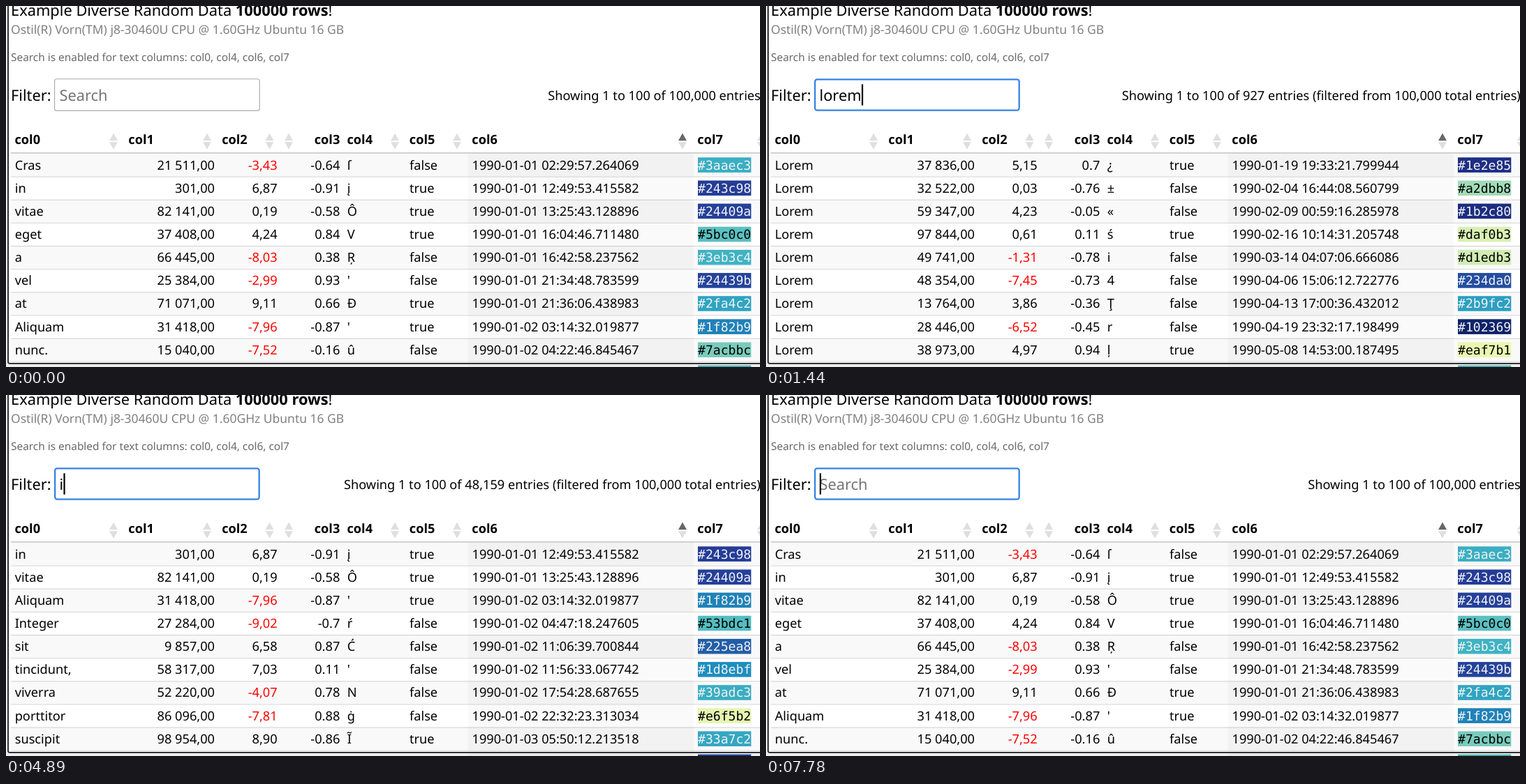
Write an HTML page that moves like this. It is 1080 px wide and 518 px high and loops after 8000 ms.

```html
<!DOCTYPE html>
<html lang="en">
<head>
<meta charset="utf-8">
<title>Filterable table</title>
<style>
html, body { margin: 0; width: 100%; height: 100%; overflow: hidden; background: #fff; }
svg { display: block; width: 1080px; height: 518px; }
text { font: 18.2px "Noto Sans", sans-serif; text-rendering: geometricPrecision; white-space: pre; }
.bold { font-weight: 700; }
.big { font-size: 21.84px; }
.cpu { font-size: 17.47px; fill: #808080; }
.note { font-size: 15.4px; fill: #696969; }
.mono { font-family: "DejaVu Sans Mono", monospace; font-size: 18.1px; }
.end { text-anchor: end; }
</style>
</head>
<body>
<svg id="stage" viewBox="0 0 1080 518"></svg>
<script>
const LOOP = 8000;
const ROW = 33.15, TOP = 211.4, BASE = 234.5, INPUT_X = 76.5;

// word | col1 | col2 | col3 | col4 | col5 | col6 | col7
const rows = `
Cras|21 511|-3,43|-0.64|ſ|false|1990-01-01 02:29:57.264069|#3aaec3
in|301|6,87|-0.91|į|true|1990-01-01 12:49:53.415582|#243c98
vitae|82 141|0,19|-0.58|Ô|true|1990-01-01 13:25:43.128896|#24409a
eget|37 408|4,24|0.84|V|true|1990-01-01 16:04:46.711480|#5bc0c0
a|66 445|-8,03|0.38|Ŗ|false|1990-01-01 16:42:58.237562|#3eb3c4
vel|25 384|-2,99|0.93|'|false|1990-01-01 21:34:48.783599|#24439b
at|71 071|9,11|0.66|Đ|true|1990-01-01 21:36:06.438983|#2fa4c2
Aliquam|31 418|-7,96|-0.87|'|true|1990-01-02 03:14:32.019877|#1f82b9
nunc.|15 040|-7,52|-0.16|û|false|1990-01-02 04:22:46.845467|#7acbbc
Integer|27 284|-9,02|-0.7|ŕ|false|1990-01-02 04:47:18.247605|#53bdc1
sit|9 857|6,58|0.87|Ć|false|1990-01-02 11:06:39.700844|#225ea8
tincidunt,|58 317|7,03|0.11|'|false|1990-01-02 11:56:33.067742|#1d8ebf
viverra|52 220|-4,07|0.78|N|false|1990-01-02 17:54:28.687655|#39adc3
porttitor|86 096|-7,81|0.88|ġ|false|1990-01-02 22:32:23.313034|#e6f5b2
suscipit|98 954|8,90|-0.86|Ĩ|true|1990-01-03 05:50:12.213518|#33a7c2
nisi|44 172|2,36|0.41|e|true|1990-01-03 07:18:52.603417|#24429b
Pellentesque|55 619|1,39|-0.74|5|false|1990-01-03 10:04:42.493177|#2fa4c2
scelerisque.|50 761|-1,27|-0.69|ä|false|1990-01-04 00:29:27.700191|#a5dcb7
vel|82 469|-6,49|-0.29|G|false|1990-01-04 01:33:48.600672|#192b7c
elit.|45 004|-2,77|0.55|Z|false|1990-01-04 10:54:12.828424|#12256d
vulputate|58 736|-8,16|0.33|?|false|1990-01-04 17:06:02.604855|#2166ac
felis|52 217|1,11|-0.05|g|false|1990-01-04 19:08:26.722471|#2094c0
Duis|84 558|-5,31|0.92|L|true|1990-01-05 08:48:05.244305|#2075b3
dolor|63 280|3,74|-0.22|w|false|1990-01-05 13:27:40.518236|#2a9fc1
lobortis|17 935|-4,60|0.49|ñ|true|1990-01-09 06:12:31.470982|#24409a
adipiscing|72 648|5,08|0.37|K|false|1990-01-11 15:40:09.336174|#a2dbb8
ipsum|80 138|6,72|0.2|Y|false|1990-01-16 21:44:39.953010|#f7fcc7
Lorem|37 836|5,15|0.7|¿|true|1990-01-19 19:33:21.799944|#1e2e85
lobortis|90 417|0,82|-0.61|7|false|1990-01-22 10:05:57.204613|#53bdc1
suscipit|33 706|-2,45|-0.18|é|true|1990-01-24 08:31:14.690257|#1f82b9
dolor|48 092|-6,17|0.14|B|true|1990-01-27 18:50:26.843095|#e6f5b2
ipsum|60 143|-6,29|0.15|ë|false|1990-01-28 01:44:21.412639|#f6fbc5
adipiscing|26 851|7,93|-0.55|q|true|1990-02-03 12:16:48.127340|#225ea8
Lorem|32 522|0,03|-0.76|±|false|1990-02-04 16:44:08.560799|#a2dbb8
lobortis|75 364|-1,98|0.8|Ä|false|1990-02-06 03:22:10.958471|#39adc3
Lorem|59 347|4,23|-0.05|«|false|1990-02-09 00:59:16.285978|#1b2c80
dolor|11 623|9,26|-0.43|d|false|1990-02-11 20:37:33.064718|#2075b3
Lorem|97 844|0,61|0.11|ś|true|1990-02-16 10:14:31.205748|#daf0b3
ipsum|64 406|4,85|0.22|Å|false|1990-02-16 20:36:24.673431|#259ac1
ipsum|53 325|7,68|-0.75|Â|false|1990-02-18 03:07:22.049422|#5dc0c0
suscipit|69 510|-8,34|0.62|h|false|1990-02-22 14:58:05.781926|#192b7c
dolor|80 275|2,51|0.97|Ó|true|1990-03-02 02:09:44.315860|#7acbbc
ipsum|57 195|6,44|-0.94|Ŵ|false|1990-03-02 05:14:17.900830|#2da2c2
ipsum|56 985|8,58|-0.52|Ī|true|1990-03-08 18:41:55.947368|#feffd6
Lorem|49 741|-1,31|-0.78|i|false|1990-03-14 04:07:06.666086|#d1edb3
ipsum|21 951|0,06|-0.32|f|false|1990-03-25 17:41:00.385201|#57bec1
ipsum|7 484|-7,77|0.86|Ŵ|true|1990-03-30 02:05:16.245877|#46b8c3
Lorem|48 354|-7,45|-0.73|4|false|1990-04-06 15:06:12.722776|#234da0
Lorem|13 764|3,86|-0.36|Ţ|false|1990-04-13 17:00:36.432012|#2b9fc2
ipsum|65 536|-5,17|0.54|T|true|1990-04-13 19:53:48.018759|#f3fabf
Lorem|28 446|-6,52|-0.45|r|false|1990-04-19 23:32:17.198499|#102369
ipsum|39 127|1,64|0.08|Ú|false|1990-04-21 09:25:51.537094|#24429b
Lorem|38 973|4,97|0.94|ļ|true|1990-05-08 14:53:00.187495|#eaf7b1
Lorem|70 812|-3,20|0.25|n|false|1990-05-11 07:46:29.650183|#5bc0c0
`.trim().split("\n").map(line => line.split("|"));

const counts = { l: "26,485", lo: "3,742", lor: "1,868", lore: "927", lorem: "927",
                 i: "48,159", ip: "3,715", ipsu: "941", ipsum: "941" };

// time, query, input state
const steps = [
  [0, "", "idle"], [110, "", "caret"],
  [670, "l", "caret"], [780, "lo", "caret"], [1110, "lor", "caret"], [1220, "lore", "caret"],
  [1440, "lorem", "caret"], [2560, "lorem", "blink"], [2890, "lorem", "selected"],
  [3330, "", "caret"],
  [4890, "i", "caret"], [5000, "ip", "caret"], [5440, "ipsu", "caret"],
  [5890, "ipsum", "caret"], [6890, "ipsum", "selected"],
  [7780, "", "caret"]
];

const stage = document.getElementById("stage");

function add(parent, tag, attrs, content) {
  const el = document.createElementNS("http://www.w3.org/2000/svg", tag);
  for (const key in attrs) el.setAttribute(key, attrs[key]);
  if (content !== undefined) el.textContent = content;
  parent.append(el);
  return el;
}
const label = (parent, x, y, content, cls = "", fill) =>
  add(parent, "text", fill ? { x, y, class: cls, fill } : { x, y, class: cls }, content);
const box = (parent, x, y, width, height, fill, opacity = 1) =>
  add(parent, "rect", { x, y, width, height, fill, "fill-opacity": opacity });

function drawHeader() {
  const title = label(stage, 7, 14.4, "Example Diverse Random Data ", "big");
  add(title, "tspan", { class: "bold big" }, "100000 rows");
  add(title, "tspan", {}, "!");
  label(stage, 7, 39.7, "Ostil(R) Vorn(TM) j8-30460U CPU @ 1.60GHz Ubuntu 16 GB", "cpu");
  label(stage, 7, 79.2, "Search is enabled for text columns: col0, col4, col6, col7", "note");
  label(stage, 7, 136.2, "Filter:", "big");

  [12.5, 175.3, 309.2, 478.3, 488.5, 577.8, 667.3, 990.3].forEach((x, i) =>
    label(stage, x, 198.3, "col" + i, i === 3 ? "bold end" : "bold"));
  [154, 288, 377.5, 405, 557, 646, 969, 1082].forEach((x, i) => {
    add(stage, "path", { d: `M${x - 6} 193.2h12l-6 -10.6z`, fill: i === 6 ? "#666" : "#dfdfdf" });
    add(stage, "path", { d: `M${x - 6} 195.2h12l-6 10.6z`, fill: "#dfdfdf" });
  });
  box(stage, 7, TOP - 1.1, 1080, 1.14, "#000", 0.3);
}

function drawRow(row, i) {
  const [word, c1, c2, c3, c4, c5, date, hex] = row;
  const top = TOP + ROW * i, y = BASE + ROW * i, odd = i % 2 === 0;
  if (odd) box(body, 7, top, 1080, ROW, "#000", 0.023);
  box(body, 661.6, top, 323.4, ROW, "#000", odd ? 0.028 : 0.019);
  if (i) box(body, 7, top, 1080, 1.14, "#000", 0.15);

  label(body, 12.7, y, word);
  label(body, 299, y, c1 + ",00", "end");
  label(body, 388.6, y, c2, "end", c2[0] === "-" ? "#f00" : "#000");
  label(body, 478.3, y, c3, "end");
  label(body, 488.8, y, c4);
  label(body, 578, y, c5);
  label(body, 667.5, y, date);
  const light = parseInt(hex.slice(3, 5), 16) > 180;
  box(body, 991, y - 17.2, 76.3, 21.6, hex);
  label(body, 991, y, hex, "mono", light ? "#000" : "#f1f1f1");
}

function drawTable(query) {
  body.replaceChildren();
  rows.filter(r => [r[0], r[4], r[6], r[7]].some(s => s.toLowerCase().includes(query)))
    .slice(0, 10).forEach(drawRow);
  info.textContent = query
    ? `Showing 1 to 100 of ${counts[query]} entries (filtered from 100,000 total entries)`
    : "Showing 1 to 100 of 100,000 entries";
}

function drawInput(query, state) {
  input.replaceChildren();
  const w = state === "idle" ? 1.15 : 2.3;
  add(input, "rect", {
    x: 69 + w / 2, y: 104.2 + w / 2, width: 294.8 - w, height: 46.5 - w, rx: 3,
    fill: "#fff", stroke: state === "idle" ? "#aaa" : "#3584e4", "stroke-width": w
  });
  const selected = state === "selected";
  const mark = selected && box(input, INPUT_X, 112.3, 0, 30.4, "#3584e4");
  const text = label(input, INPUT_X, 136.2, query || "Search", "big",
    selected ? "#fff" : query ? "#000" : "#757575");
  const width = query ? text.getComputedTextLength() : 0;
  if (mark) mark.setAttribute("width", width);
  if (state === "caret") box(input, INPUT_X + width + 0.3, 112.3, 2.2, 30.4, "#000");
}

drawHeader();
const input = add(stage, "g", {});
const info = label(stage, 1080.8, 134.5, "", "end");
const body = add(stage, "g", {});

// window edge with a soft shade outside it
add(stage, "path", { d: "M0 0H2V514H1080V518H0z", fill: "#000", "fill-opacity": 0.07 });
add(stage, "path", { d: "M3 0V510.5Q3 513 5.5 513H1080", fill: "none", stroke: "#333", "stroke-width": 2 });

let shown, shownQuery;
function show(time) {
  const step = steps.findLast(s => s[0] <= time);
  if (step === shown) return;
  shown = step;
  const [, query, state] = step;
  if (query !== shownQuery) drawTable(shownQuery = query);
  drawInput(query, state);
}

const start = performance.now();
function tick() {
  show((performance.now() - start) % LOOP);
  requestAnimationFrame(tick);
}
tick();
</script>
</body>
</html>
```
